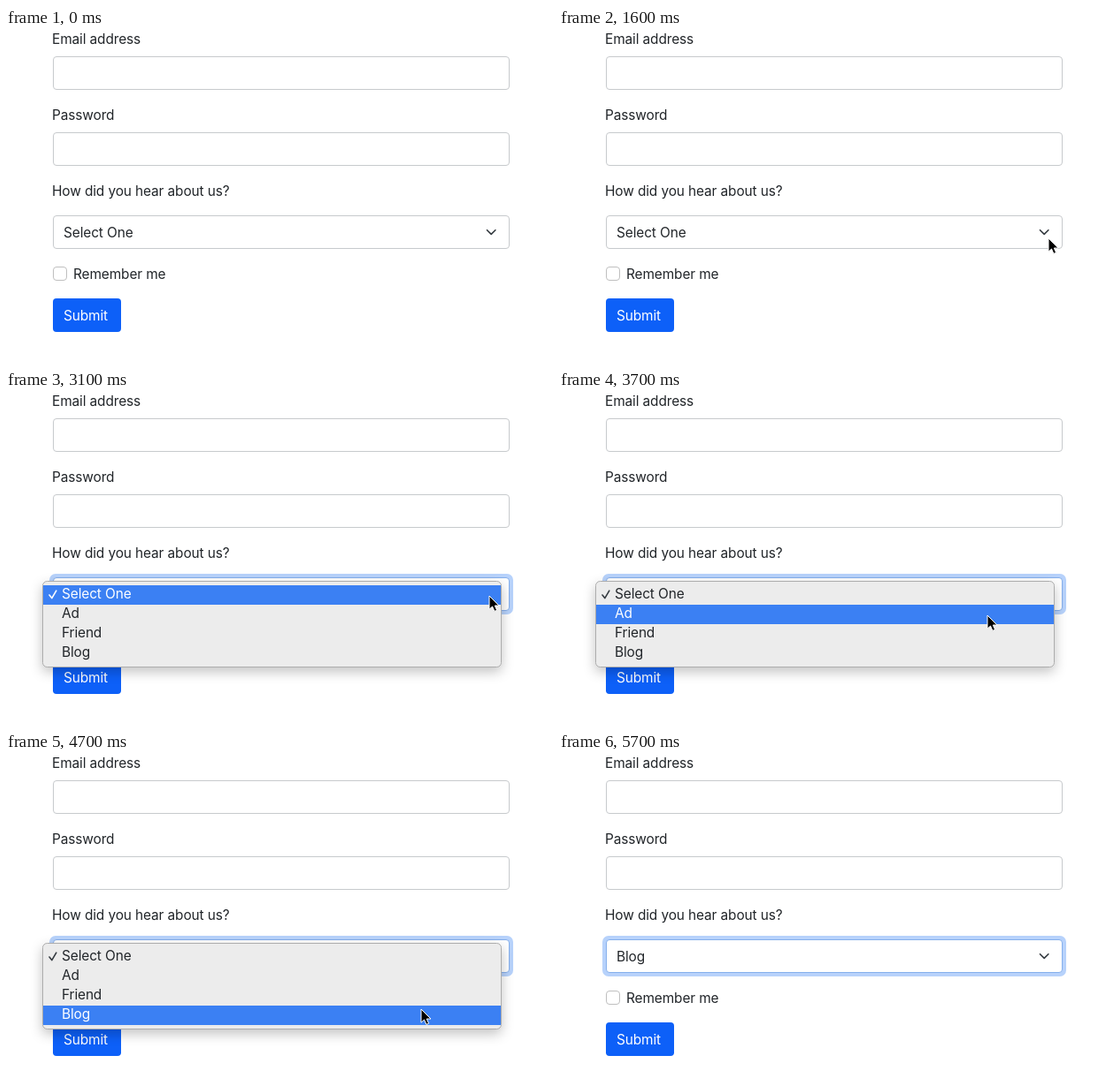
An HTML page for the animation above (5.8 s loop, 618 by 378 pixels).

```html
<!DOCTYPE html>
<html lang="en">
<head>
<meta charset="utf-8">
<title>Sign-up form</title>
<style>
html, body { margin: 0; width: 100%; height: 100%; overflow: hidden; background: #fff; }
svg { display: block; }
text { font: 15.4px Inter, "Open Sans", sans-serif; letter-spacing: -.1px; fill: #212529; }
.field { fill: #fff; stroke: #c7cacd; }
.light { fill: #fff; }
.line { fill: none; stroke: #343a40; stroke-width: 1.6; stroke-linecap: round; stroke-linejoin: round; }
#panel { fill: #ececec; stroke: #adadad; filter: drop-shadow(0 5px 7px rgba(0, 0, 0, .24)); }
</style>
</head>
<body>
<svg width="618" height="378" viewBox="0 0 618 378">
  <text x="52" y="18">Email address</text>
  <rect class="field" x="53.5" y="32.5" width="515" height="37" rx="3.5"/>
  <text x="52" y="104">Password</text>
  <rect class="field" x="53.5" y="118.5" width="515" height="37" rx="3.5"/>
  <text x="52" y="190">How did you hear about us?</text>

  <rect id="ring" x="49" y="208" width="524" height="46" rx="7" fill="#b7d2fb"/>
  <rect id="select" class="field" x="53.5" y="212.5" width="515" height="37" rx="3.5"/>
  <text id="value" x="65" y="237"></text>
  <path class="line" d="M543.5 228.7l4.7 4.7 4.7-4.7"/>

  <rect class="field" x="53.5" y="270.5" width="15" height="15" rx="3.5" style="stroke:#bfbfbf"/>
  <text x="76" y="284">Remember me</text>
  <rect x="53" y="306" width="77" height="38" rx="4" fill="#0d60f8"/>
  <text class="light" x="65" y="331">Submit</text>

  <g id="menu">
    <rect id="panel" x="41.5" y="216.5" width="518" height="97" rx="5"/>
    <rect id="bar" x="42" width="517" height="22" fill="#3b80f3"/>
    <path id="check" class="line" d="M49 232l2.8 3.6 5-8.4"/>
  </g>

  <path id="cursor" d="M0 0V15.2L3.5 12 5.9 17.4 8.6 16.2 6.3 11H11Z" fill="#000" stroke="#fff"/>
</svg>
<script>
const LOOP = 5800, STEP = 100, OPEN = 2800, CLOSE = 5100;
const ROW_TOP = 221, ROW = 22;
const options = ["Select One", "Ad", "Friend", "Blog"];
const $ = id => document.getElementById(id);

// Pointer stops: time, x, y
const path = [
  [700, 640, 405], [900, 606, 362], [1200, 566, 268], [1600, 553, 238],
  [1800, 549, 233], [2600, 549, 233], [3100, 546, 233], [3700, 484, 255],
  [4200, 474, 276], [4700, 469, 291], [5100, 468, 292], [5400, 446, 322],
  [5600, 432, 366], [5700, 422, 396]
];

const labels = options.map((name, i) => {
  const label = document.createElementNS("http://www.w3.org/2000/svg", "text");
  label.setAttribute("x", 63);
  label.setAttribute("y", ROW_TOP + 15 + i * ROW);
  label.textContent = name;
  $("menu").append(label);
  return label;
});

function pointerAt(t) {
  const i = path.findIndex(p => p[0] > t);
  if (i < 1) return null;
  const [a, b] = [path[i - 1], path[i]];
  const k = (t - a[0]) / (b[0] - a[0]);
  const ease = k * k * (3 - 2 * k);
  return [a[1] + (b[1] - a[1]) * ease, a[2] + (b[2] - a[2]) * ease];
}

function show(id, on) {
  $(id).style.display = on ? "" : "none";
}

function draw(now) {
  const t = Math.floor(now % LOOP / STEP) * STEP;
  const focused = t >= OPEN, open = focused && t < CLOSE;
  const pointer = pointerAt(t);

  show("ring", focused);
  show("menu", open);
  show("cursor", pointer);
  $("select").style.stroke = focused ? "#86b0ec" : "";
  $("value").textContent = options[t >= CLOSE ? 3 : 0];

  if (pointer) $("cursor").setAttribute("transform", `translate(${pointer})`);
  if (open) {
    const active = Math.floor((pointer[1] - ROW_TOP) / ROW);
    $("bar").setAttribute("y", ROW_TOP + active * ROW);
    $("check").style.stroke = active ? "" : "#fff";
    labels.forEach((label, i) => label.classList.toggle("light", i === active));
  }
  requestAnimationFrame(draw);
}
requestAnimationFrame(draw);
</script>
</body>
</html>
```
